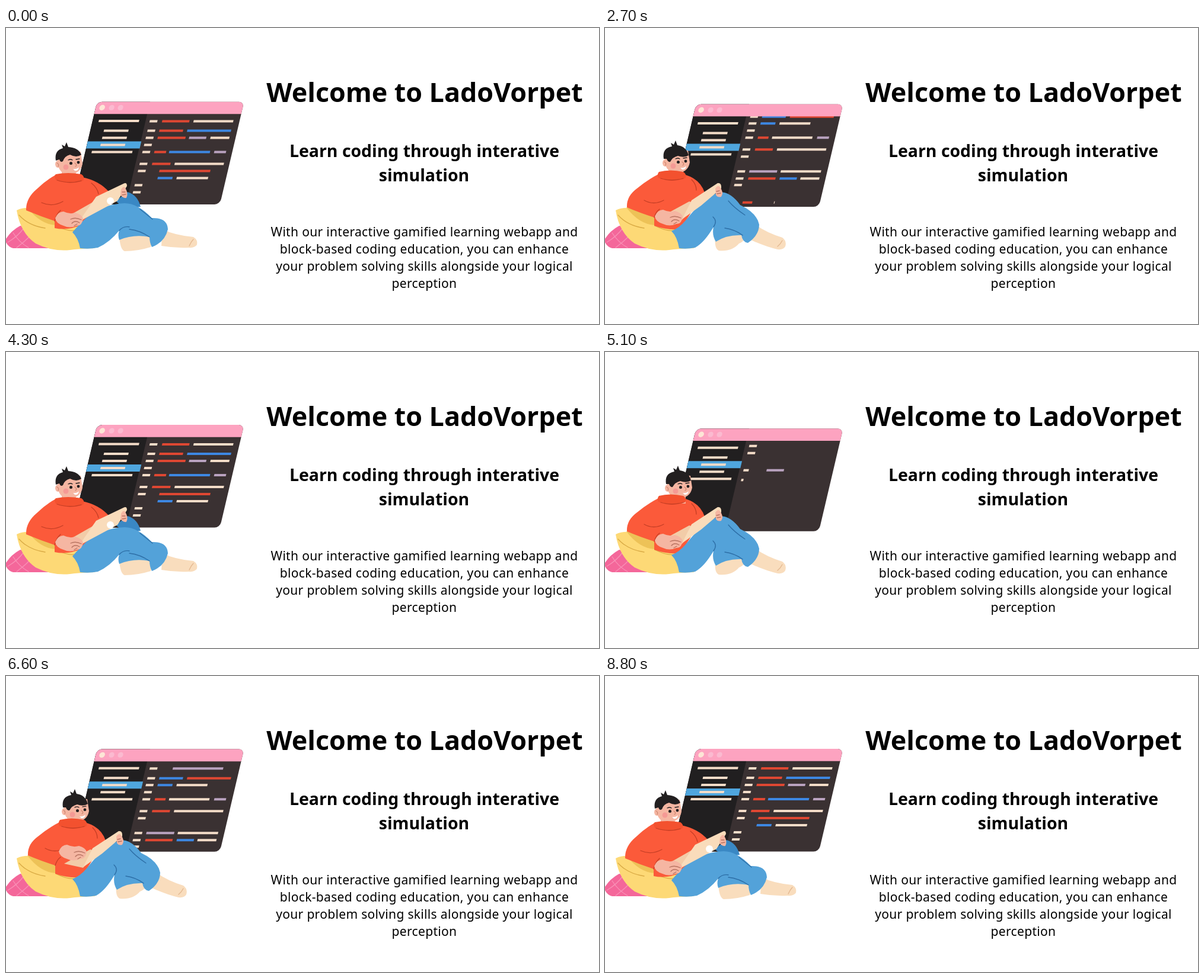
Recreate the animation shown at these times as an HTML page. Size 1000x500 px, loop 8.83 s.

```html
<!DOCTYPE html>
<html lang="en">
<head>
<meta charset="utf-8">
<title>Welcome</title>
<style>
  html, body { margin: 0; width: 100%; height: 100%; overflow: hidden; background: #fff; }
  svg { display: block; width: 100vw; height: 100vh; }
  text { font-family: "Noto Sans", "Open Sans", sans-serif; text-anchor: middle; }
  .title { font-size: 44.8px; font-weight: 700; }
  .lead { font-size: 28.4px; font-weight: 700; }
  .body { font-size: 21px; letter-spacing: .33px; }
  .line { fill: none; stroke-width: 1.3; stroke-linecap: round; }
  .skin { fill: #f5b6a2; }
  .foot { fill: #f9ddbd; }
  .jeans { fill: #53a2d9; }
  .top { fill: #fb5a3a; }
  .ink { fill: #221f20; }
  .cream { fill: #f3dcc8; }
</style>
</head>
<body>
<svg viewBox="0 0 1000 500">
  <defs>
    <clipPath id="frame"><rect x="153.5" width="248" height="173.5" rx="9"/></clipPath>
    <clipPath id="editor"><rect x="243" y="20.5" width="160" height="153"/></clipPath>
  </defs>

  <g id="window">
    <g clip-path="url(#frame)">
      <rect x="150" width="260" height="180" fill="#3a3132"/>
      <rect x="150" width="93" height="180" fill="#211f20"/>
      <rect id="highlight" x="150" width="94" height="12" fill="#4fa6de"/>
      <g class="cream">
        <rect x="164" y="30.5" width="68" height="4"/>
        <rect x="176.5" y="47" width="41.5" height="4"/>
        <rect x="176.5" y="59" width="41.5" height="4"/>
        <rect x="176.5" y="71" width="41.5" height="4"/>
        <rect x="164.5" y="83" width="68.5" height="4"/>
      </g>
      <g clip-path="url(#editor)"><g id="code"></g></g>
      <rect x="150" width="260" height="20.800" fill="#fda3c0"/>
      <circle cx="164.5" cy="10" r="4.7" fill="#fde6d6"/>
      <circle cx="180.5" cy="10" r="4.5" fill="#fbbad0"/>
      <circle cx="195.5" cy="10" r="4.5" fill="#fbbad0"/>
    </g>
  </g>

  <path d="M0 362V356Q9 342 24 334L90 350V372H12Q4 370 0 362Z" fill="#f4679a"/>
  <path class="line" stroke="#f990b6" d="M3 362Q20 352 30 338M12 346Q22 362 38 371M18 371Q30 362 40 352"/>
  <path fill="#fdd976" d="M18 308Q28 303 42 304L90 318L150 345V372Q122 373 108 375Q78 378 50 364Q24 346 18 308Z"/>
  <path fill="#edc257" d="M36 303Q60 303 84 318V333Q58 332 36 303Z"/>
  <path class="line" stroke="#d9aa44" d="M22 316Q38 334 66 338M84 334Q104 344 118 342"/>

  <path fill="#3a88c4" d="M185 292L200 283Q210 286 216 300L200 306Z"
    data-to="M185 292L205 277Q222 282 227 302L200 306Z"/>
  <path class="foot" d="M250 330Q272 346 299 354Q307 360 304 369Q301 375 291 374Q270 369 246 358Z"
    data-to="M264 340Q284 350 316 353Q324 358 322 366Q318 372 308 371Q285 372 262 368Z"/>
  <path class="line" stroke="#e3b78f" d="M299 359Q296 365 291 369" data-to="M316 357Q312 361 309 368"/>
  <path class="foot" d="M186 352L236 345Q238 360 226 364Q214 378 192 376Q184 373 186 352Z"
    data-to="M191 350L242 349Q248 364 244 370Q222 377 200 377Q192 374 191 350Z"/>

  <path class="top" d="M92 246Q72 256 54 271Q36 284 37 303Q58 312 83 320L83 334Q105 342 128 340Q142 315 168 278Q160 254 132 247Z"
    data-to="M84 248Q66 258 52 272Q33 288 34 308Q58 318 82 326L82 338Q105 343 128 332Q145 310 178 282Q160 258 128 252Z"/>
  <path class="line" stroke="#c43e25" d="M66 291Q82 300 99 291M83 320Q86 310 92 306M146 256Q154 264 154 274"
    data-to="M60 295Q78 303 96 293M82 326Q85 314 92 308M144 262Q154 270 156 280"/>

  <path class="jeans" d="M112 343Q125 338 136 325Q165 288 188 279Q208 272 228 299Q256 312 260 332Q260 350 241 363Q232 362 230 350Q205 349 187 361Q180 350 183 336Q168 362 152 371Q137 374 125 372Q122 353 112 343Z"
    data-to="M112 345Q125 330 136 320Q160 298 200 296Q222 296 246 321Q272 320 273 340Q268 362 246 370Q242 362 242 353Q215 348 191 358Q188 350 191 342Q175 362 155 371Q140 374 125 372Q122 355 112 345Z"/>
  <path class="line" stroke="#2d6ea6" d="M183 336Q190 326 182 319M202 338Q218 340 232 350M208 292Q218 304 236 316"
    data-to="M191 342Q198 334 208 336M208 340Q226 342 242 353M226 306Q236 314 247 323"/>

  <g id="head">
    <path class="skin" d="M94 236H118V256H94Z"/>
    <path class="skin" d="M87 214Q84 246 105 247Q126 247 129 229L126 209L90 207Z"/>
    <ellipse class="skin" cx="87.5" cy="230" rx="4.5" ry="6"/>
    <path class="line" stroke="#d08872" d="M86 228Q90 230 88 234M116 228Q121 232 117 234"/>
    <circle cx="101" cy="235" r="4.5" fill="#f59a95"/>
    <path class="ink" d="M85 223Q82 205 99 202L97 196L102 199L105 192L108 200Q123 202 127 217Q120 222 109 218Q100 220 96 228Q92 229 90 223Z"
      data-to="M84 224Q81 207 96 203L94 197L99 200L102 193L105 201Q122 202 127 214Q119 220 108 214Q99 216 96 225Q92 228 90 222Z"/>
    <circle class="ink" cx="109.5" cy="228.5" r="2.5"/>
    <circle class="ink" cx="122" cy="227" r="2.4"/>
    <path class="line" stroke="#221f20" d="M105 223Q109 221 112 223M118 222L124 221"/>
    <path fill="#fff" d="M113 238Q119 239 123 235Q122 242 116 241Z"/>
  </g>
  <path fill="#f3512f" d="M91 243Q110 238 132 243Q139 248 135 254Q112 262 90 253Q87 247 91 243Z"
    data-to="M84 247Q104 243 127 247Q134 252 130 258Q106 266 84 256Q80 250 84 247Z"/>
  <path class="line" stroke="#c43e25" d="M94 254Q112 260 132 254" data-to="M86 257Q106 264 127 258"/>

  <path fill="#f2cca8" d="M98 317L142 293L152 296L130 324Z" data-to="M108 316L150 292L160 296L126 327Z"/>
  <path fill="#f9dcbb" d="M130 323L146 291L190 262Q197 261 196 271L162 300Z"
    data-to="M123 327L152 285L198 263Q204 260 204 267L188 292Z"/>
  <circle id="badge" cx="176" cy="292" r="6" fill="#fff"/>
  <path class="skin" d="M186 271Q191 264 194 269Q201 278 196 285Q190 287 187 282Z"
    data-to="M194 273Q198 266 201 270Q207 280 203 287Q197 288 193 282Z"/>
  <path class="line" stroke="#b87462" d="M188 276L193 275M189 280L195 279" data-to="M196 277L201 277M196 282L202 281"/>
  <g id="hand">
    <path class="skin" d="M84 318Q89 307 98 307Q108 312 118 309Q129 312 131 319Q129 332 120 331Q109 336 98 331Q85 327 84 318Z"/>
    <path class="line" stroke="#b87462" d="M110 320Q118 316 128 321M112 327Q117 321 125 326M116 331L121 328"/>
  </g>

  <text class="title" x="706" y="125">Welcome to LadoVorpet</text>
  <text class="lead"><tspan x="705.5" y="218">Learn coding through interative</tspan><tspan x="705" y="258.5">simulation</tspan></text>
  <text class="body"><tspan x="705.5" y="352">With our interactive gamified learning webapp and</tspan><tspan x="705.5" y="381">block-based coding education, you can enhance</tspan><tspan x="705.5" y="410">your problem solving skills alongside your logical</tspan><tspan x="705.5" y="439">perception</tspan></text>
</svg>

<script>
const LOOP = 8830, CYCLE = 4500, BOB = 2250;
const $ = id => document.getElementById(id);
const COLORS = { c: '#f3dcc8', r: '#df4732', b: '#3d87e2', l: '#b9a2bf' };

// Each row: height, bars as colour + start-end, optional flag for no line marker
const FIRST = [
  [33, 'r271-317 c324-391'], [49, 'r270-310 b317-391'], [61, 'r270-317 l323-352 c359-391'],
  [73, ''], [85, 'r270-290 b295-364 l371-391'], [105, 'r271-302 c309-392'], [117, 'r286-372'],
  [129, 'b286-311 c318-371', true], [141, ''], [153, '']
];
const SECOND = [
  [33, 'l289-374'], [49.5, 'b270-310 r317-391'], [61, 'b270-295 c302-354'], [73, ''],
  [85, 'r271-289 c295-363 l371-391'], [105, 'r271-301 c308-391'], [117, ''],
  [142, 'l270-317 c323-391'], [154, 'r271-317 b324-353 c359-391'], [165, '']
];
const SECOND_Y = 149, REPEAT_Y = 310.5;
const ROW_GAP = 97, BAR_GAP = 85, BAR_TIME = 250;

const bars = [];
function addPage(rows, shift, begin) {
  rows.forEach(([y, spec, bare], i) => {
    const parts = spec ? spec.split(' ') : [];
    if (!bare) parts.unshift('c250-263');
    parts.forEach((part, k) => {
      const [from, to] = part.slice(1).split('-').map(Number);
      const el = document.createElementNS('http://www.w3.org/2000/svg', 'rect');
      el.setAttribute('x', from);
      el.setAttribute('y', y + shift - 2);
      el.setAttribute('height', 4);
      el.setAttribute('fill', COLORS[part[0]]);
      $('code').append(el);
      bars.push({ el, width: to - from, start: begin + ROW_GAP * i + BAR_GAP * k });
    });
  });
}
addPage(FIRST, 0, -CYCLE);
addPage(SECOND, SECOND_Y, 430);
addPage(FIRST, REPEAT_Y, 2527);

const clamp = v => Math.min(1, Math.max(0, v));

// Eased value along [time, value] stops
function track(t, stops) {
  let [t0, v0] = stops[0];
  for (const [t1, v1] of stops) {
    if (t < t1) {
      const u = clamp((t - t0) / (t1 - t0));
      return v0 + (v1 - v0) * u * u * (3 - 2 * u);
    }
    [t0, v0] = [t1, v1];
  }
  return v0;
}

const NUMBER = /\d+(\.\d+)?/g;
const morphs = [...document.querySelectorAll('[data-to]')].map(el => ({
  el, from: el.getAttribute('d'), to: el.dataset.to.match(NUMBER).map(Number)
}));

function draw(now) {
  const time = now % LOOP, t = time % CYCLE;
  const top = 126 - 3.5 * Math.cos(2 * Math.PI * (time - 1850) / BOB);
  $('window').setAttribute('transform', `translate(0 ${top}) skewX(-13.22)`);
  $('highlight').setAttribute('y', track(t, [[150, 67], [400, 55], [2350, 55], [2600, 67]]));

  const scroll = track(t, [[150, 0], [820, SECOND_Y], [2500, SECOND_Y], [3255, REPEAT_Y]]);
  $('code').setAttribute('transform', `translate(0 ${-scroll})`);
  for (const { el, width, start } of bars) {
    el.setAttribute('width', width * clamp((t - start) / BAR_TIME));
  }

  const recline = track(t, [[150, 1], [500, 0], [3000, 0], [3500, 1]]);
  for (const { el, from, to } of morphs) {
    let i = 0;
    el.setAttribute('d', from.replace(NUMBER, n => +n + (to[i++] - n) * recline));
  }
  $('badge').setAttribute('opacity', clamp(recline * 2 - 1));

  const headX = track(t, [[150, 0], [500, 18], [1500, 18], [2000, 11], [2200, 11], [2700, 14], [3000, 14], [3500, 0]]);
  const headY = track(t, [[1500, 0], [2000, -1], [2700, -2], [3000, -2], [3500, 0]]);
  $('head').setAttribute('transform', `translate(${headX} ${headY})`);

  const handX = track(t, [[1500, 0], [2000, 5], [2200, 5], [2600, 0]]) - recline;
  const handY = track(t, [[700, 0], [1200, -7], [1500, -7], [2000, -22], [2200, -22], [2600, 0]]) + 3 * recline;
  $('hand').setAttribute('transform', `translate(${handX} ${handY})`);
}

const begin = performance.now();
function tick() {
  draw(performance.now() - begin);
  requestAnimationFrame(tick);
}
tick();
</script>
</body>
</html>
```
